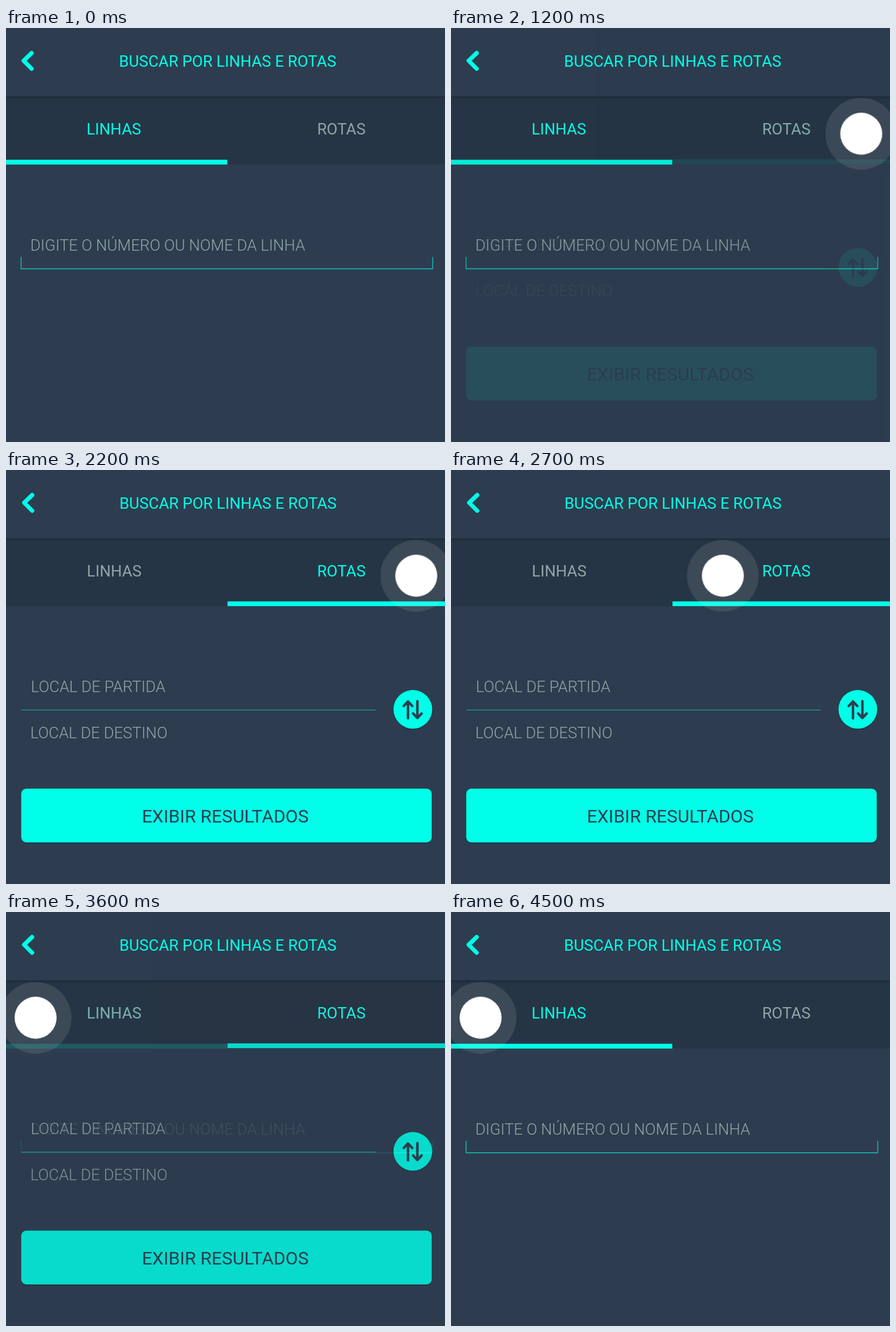
Write an HTML page that moves like this. It is 771 px wide and 727 px high and loops after 6100 ms.

```html
<!DOCTYPE html>
<html lang="pt-BR">
<head>
<meta charset="utf-8">
<title>Buscar por linhas e rotas</title>
<style>
  :root { --bg: #2d3d4f; --tab: #263545; --cyan: #00ffe8; --gray: #93a3a6; }
  html, body { margin: 0; width: 100%; height: 100%; overflow: hidden; background: var(--bg); }
  svg { display: block; width: 100vw; height: 100vh; }
  text { font: 400 27.5px Roboto, sans-serif; fill: var(--gray); }
  .on { fill: var(--cyan); }
  .hint { font-weight: 300; fill: #95a5a8; }
  .action { font-size: 31.8px; fill: var(--bg); }
  .bg { fill: var(--bg); }
  .tab { fill: var(--tab); }
  .line { fill: none; stroke: #15b8ae; }
  .field { stroke: #14c4b8; stroke-width: 1.4; }
  .back { fill: none; stroke: var(--cyan); stroke-width: 7.4; stroke-linecap: round; stroke-linejoin: round; }
  .arrows { fill: none; stroke: var(--bg); stroke-width: 4.4; stroke-linecap: round; stroke-linejoin: round; }
  .raised { filter: drop-shadow(0 1px 1px rgba(0, 0, 0, .3)); }

  #routes, #touch { animation: 6100ms steps(11) infinite; }
  #routes { animation-name: swap; }
  #touch { animation-name: touch; }
  @keyframes swap {
    0%, 18.032% { opacity: 0; }
    36.065%, 55.737% { opacity: 1; }
    73.77%, 100% { opacity: 0; }
  }
  @keyframes touch {
    0% { opacity: 0; transform: translate(720.5px, 185.6px); }
    18.032%, 37.704% { opacity: 1; transform: translate(720.5px, 185.6px); }
    55.737%, 100% { opacity: 1; transform: translate(52px, 185.6px); }
  }
</style>
</head>
<body>
<svg viewBox="0 0 771 727">
  <defs>
    <linearGradient id="shade" x2="0" y2="1">
      <stop offset="0" stop-color="#1d2937"/>
      <stop offset="1" stop-color="#263545"/>
    </linearGradient>
    <g id="frame">
      <rect class="bg" width="771" height="727"/>
      <rect class="tab" y="120" width="771" height="119.5"/>
      <rect y="120" width="771" height="5" fill="url(#shade)"/>
    </g>
    <path id="back" class="back" d="M45 44L31 57.5L45 71.5"/>
  </defs>

  <g id="lines">
    <use href="#frame"/>
    <use href="#back"/>
    <text class="on" x="198.6" y="68">BUSCAR POR LINHAS E ROTAS</text>
    <text class="on" x="141.4" y="187">LINHAS</text>
    <text x="546.4" y="187">ROTAS</text>
    <rect class="on" y="231.4" width="388.6" height="8.4"/>
    <text class="hint" x="42.8" y="390.5">DIGITE O NÚMERO OU NOME DA LINHA</text>
    <path class="line field" d="M26.5 402V422.8H749.5V402"/>
  </g>

  <g id="routes">
    <use href="#frame"/>
    <use href="#back" x="1"/>
    <text class="on" x="199.2" y="68">BUSCAR POR LINHAS E ROTAS</text>
    <text x="142.1" y="186.5">LINHAS</text>
    <text class="on" x="546.4" y="186.5">ROTAS</text>
    <rect class="on" x="389" y="230.7" width="382" height="8.4"/>
    <text class="hint" x="43.8" y="390">LOCAL DE PARTIDA</text>
    <path class="line" d="M27 421.5H649"/>
    <text class="hint" x="42.8" y="471">LOCAL DE DESTINO</text>
    <circle class="on raised" cx="714.5" cy="420.3" r="34"/>
    <path class="arrows" d="M706 436V407M698.5 414.5L706 406.5L713.5 414.5M722.5 406V435M715 427.5L722.5 435.5L730 427.5"/>
    <rect class="on raised" x="26.7" y="559.6" width="721" height="94.4" rx="9"/>
    <text class="action" x="238.8" y="619">EXIBIR RESULTADOS</text>
  </g>

  <g id="touch" fill="#fff">
    <circle r="63" opacity=".1"/>
    <circle r="36.9"/>
  </g>
</svg>
</body>
</html>
```
